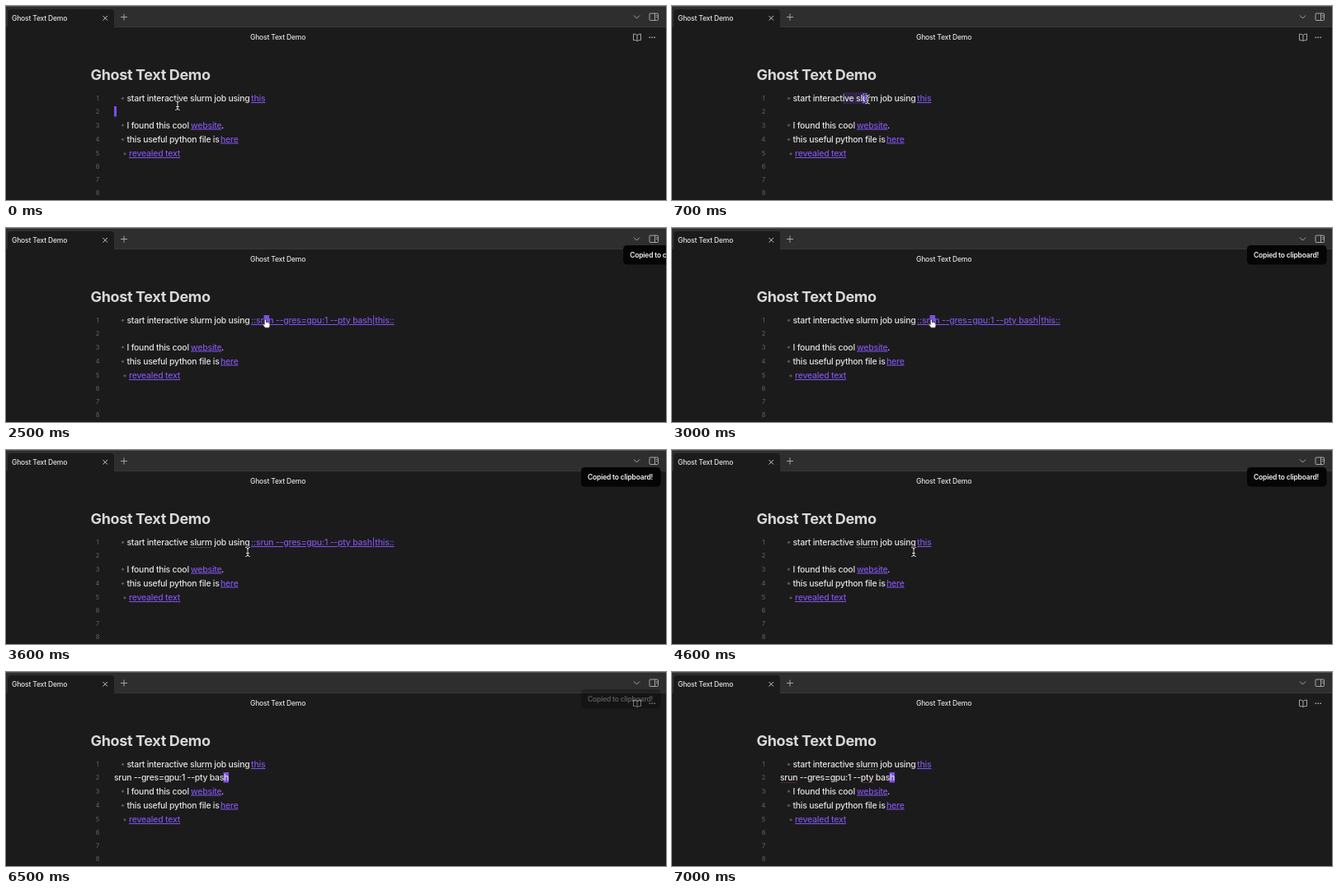
An HTML page that plays this animation: 800 px wide and 236 px high, repeating every 7300 ms.

```html
<!DOCTYPE html>
<html lang="en">
<head>
<meta charset="utf-8">
<title>Ghost Text Demo</title>
<style>
html, body { margin: 0; width: 100%; height: 100%; overflow: hidden; background: #1b1b1b; }
svg { display: block; width: 800px; height: 236px; }
text { font: 450 10.4px Inter, Roboto, sans-serif; font-feature-settings: "calt" 0; letter-spacing: -.23px; fill: #e2e2e2; white-space: pre; }
.small { font-size: 8.5px; letter-spacing: -.18px; }
.notice { font-weight: 600; fill: #eee; letter-spacing: -.2px; }
.title { font-size: 18px; font-weight: 700; letter-spacing: -.36px; fill: #d8d8d8; }
.num { font-size: 7.4px; fill: #5c5c5c; text-anchor: middle; letter-spacing: 0; }
.link { font-weight: 500; fill: #7f52e6; letter-spacing: -.17px; text-decoration: underline 1px; }
.icon { fill: none; stroke: #a4a4a4; stroke-width: 1; }
.spell { stroke: #7c7c7c; stroke-width: .8; stroke-dasharray: 1 1; }
.red { stroke: #a34545; }
</style>
</head>
<body>
<svg viewBox="0 0 800 236">
  <rect width="800" height="26" fill="#2e2e2e"/>
  <rect width="800" height="1" fill="#525252"/>
  <path d="M0 26q2 0 2-3V8q0-4 4-4H127q4 0 4 4V23q0 3 3 3z" fill="#1b1b1b"/>
  <path d="M131 25.5H800" stroke="#363636"/>
  <text class="small" x="7" y="17.5">Ghost Text Demo</text>
  <text class="small" x="296" y="41.3">Ghost Text Demo</text>
  <g class="icon">
    <path d="M117.5 12l5.5 5.5M123 12l-5.5 5.5" stroke="#c4c4c4"/>
    <path d="M139 13.5h8M143 9.5v8"/>
    <path d="M761 11.5l3.5 3.5 3.5-3.5"/>
    <rect x="780" y="9" width="10.5" height="8.5" rx="1"/>
    <path d="M786.5 9v8.5M788 11.5h1.5M788 13.5h1.5"/>
    <path d="M765 35.5q-1.5-1.5-4.5-1.5v7.5q3 0 4.5 1 1.5-1 4.5-1V34q-3 0-4.5 1.5v7"/>
  </g>
  <path d="M779.5 38.3h1.6m1.3 0h1.6m1.3 0h1.6" stroke="#a4a4a4" stroke-width="1.6"/>
  <text class="title" x="102.6" y="90">Ghost Text Demo</text>
  <g id="gutter"></g>
  <rect id="selection" x="207" y="105" height="14" fill="#2e2443"/>
  <rect id="caret" height="12.5" fill="#7c4fe4"/>
  <text x="146.5" y="116">start interactive slurm job using</text>
  <text id="ghost" class="link" x="297" y="116"></text>
  <path id="slurm" class="spell" d="M223 118.5h26"/>
  <g id="pasted">
    <text x="131" y="132">srun --gres=gpu:1 --pty bash</text>
    <path id="typos" class="spell red" d="M132 134.5h20M231 134.5h14"/>
  </g>
  <text x="146.5" y="148.5">I found this cool</text>
  <text class="link" x="224" y="148.5">website</text>
  <text x="261" y="148.5">.</text>
  <text x="146.5" y="165.5">this useful python file is</text>
  <text class="link" x="260" y="165.5">here</text>
  <text class="link" x="149" y="183">revealed text</text>
  <g id="toast">
    <rect y="21" width="96.5" height="23.5" rx="4.5" fill="#050505"/>
    <text class="small notice" x="8" y="36">Copied to clipboard!</text>
  </g>
  <g id="mouse">
    <g id="beam" fill="none" stroke-linecap="round">
      <path id="beamShape" d="M-2.5-5.5Q0-5.5 0-3.5 0-5.5 2.5-5.5M0-3.5V3.5M-2.5 5.5Q0 5.5 0 3.5 0 5.5 2.5 5.5M-1.5 1.5h3"/>
    </g>
    <path id="hand" d="M-1.8 1.5V-4q0-1.2 1.1-1.2T.4-4v2.6q2.2-.5 3.3.6 1.2 0 1.2 1.6V2.6q0 1.2-.9 2.8H-1.1Q-2.2 3.6-3.9 1.7q-.5-1.3.8-1.2z" fill="#fff" stroke="#222" stroke-width=".8"/>
  </g>
</svg>
<script>
const $ = id => document.getElementById(id);
const LOOP = 7300;
const show = (id, on) => $(id).style.display = on ? "" : "none";
const clamp = v => Math.max(0, Math.min(1, v));
const set = (id, attrs) => {
  for (const k in attrs) $(id).setAttribute(k, attrs[k]);
};

// Line numbers and list bullets
const rows = [112, 128.5, 144.7, 162, 179.5, 195.5, 211.3, 226.7];
const bullets = { 0: 141.5, 2: 141.5, 3: 141.5, 4: 144 };
$("gutter").innerHTML = rows.map((y, i) =>
  `<text class="num" x="111" y="${y + 2.8}">${i + 1}</text>` +
  (bullets[i] ? `<circle cx="${bullets[i]}" cy="${y + .3}" r="1.6" fill="#555"/>` : "")
).join("");

// Text pointer: light line over a dark outline
const beamLine = $("beamShape").getAttribute("d");
$("beam").innerHTML = [["#111", 2.6], ["#ddd", 1]].map(([color, width]) =>
  `<path d="${beamLine}" stroke="${color}" stroke-width="${width}"/>`
).join("");

// Pointer path: time, x, y
const path = [
  [0, 208, 121], [250, 208, 113], [700, 237, 113.5], [1300, 299, 115],
  [1500, 311, 116], [1800, 315, 116], [3200, 315, 116], [3600, 293, 124]
];

function pointerAt(t) {
  const i = path.findIndex(p => p[0] > t);
  if (i < 0) return path[path.length - 1].slice(1);
  const [t0, x0, y0] = path[i - 1], [t1, x1, y1] = path[i];
  const k = (t - t0) / (t1 - t0);
  return [x0 + (x1 - x0) * k, y0 + (y1 - y0) * k];
}

// Caret as [x, y, width], or null while it is blinked off
function caretAt(t, x) {
  if (t < 200) return [131, 122, 3];
  if (t < 1300) return [Math.max(207, x - 6), 106, 6];
  if (t < 1600) return [471, 106, 3];
  if (t < 3100) return [312.5, 106, 6.5];
  if (t < 3700) return null;
  if (t < 5200) return t < 4400 ? [131, 122, 3] : null;
  return t < 5800 || t >= 6400 ? [263.5, 122, 6.5] : null;
}

function draw(t) {
  const [x, y] = pointerAt(t);
  const open = t >= 1300 && t < 3700;
  $("ghost").textContent = open ? "::srun --gres=gpu:1 --pty bash|this::" : "this";

  const selecting = t >= 250 && t < 1600;
  show("selection", selecting);
  if (selecting) set("selection", { width: (open ? 474 : Math.max(207, x)) - 207 });

  const caret = caretAt(t, x);
  show("caret", caret);
  if (caret) set("caret", { x: caret[0], y: caret[1], width: caret[2] });

  const onLink = x > 296 && y < 119;
  show("mouse", t < 5200);
  show("hand", onLink);
  show("beam", !onLink);
  set("mouse", { transform: `translate(${x} ${y})` });

  show("slurm", t >= 3600);
  show("pasted", t >= 5200);
  show("typos", t >= 6900);

  const slide = (1 - clamp((t - 2400) / 500)) ** 3;
  show("toast", t >= 2500 && t < 6600);
  set("toast", {
    transform: `translate(${697 + 100 * slide} 0)`,
    opacity: 1 - clamp((t - 6250) / 350)
  });
}

function tick() {
  // The picture advances ten times per second
  draw(Math.floor(performance.now() % LOOP / 100) * 100);
  requestAnimationFrame(tick);
}
tick();
</script>
</body>
</html>
```
